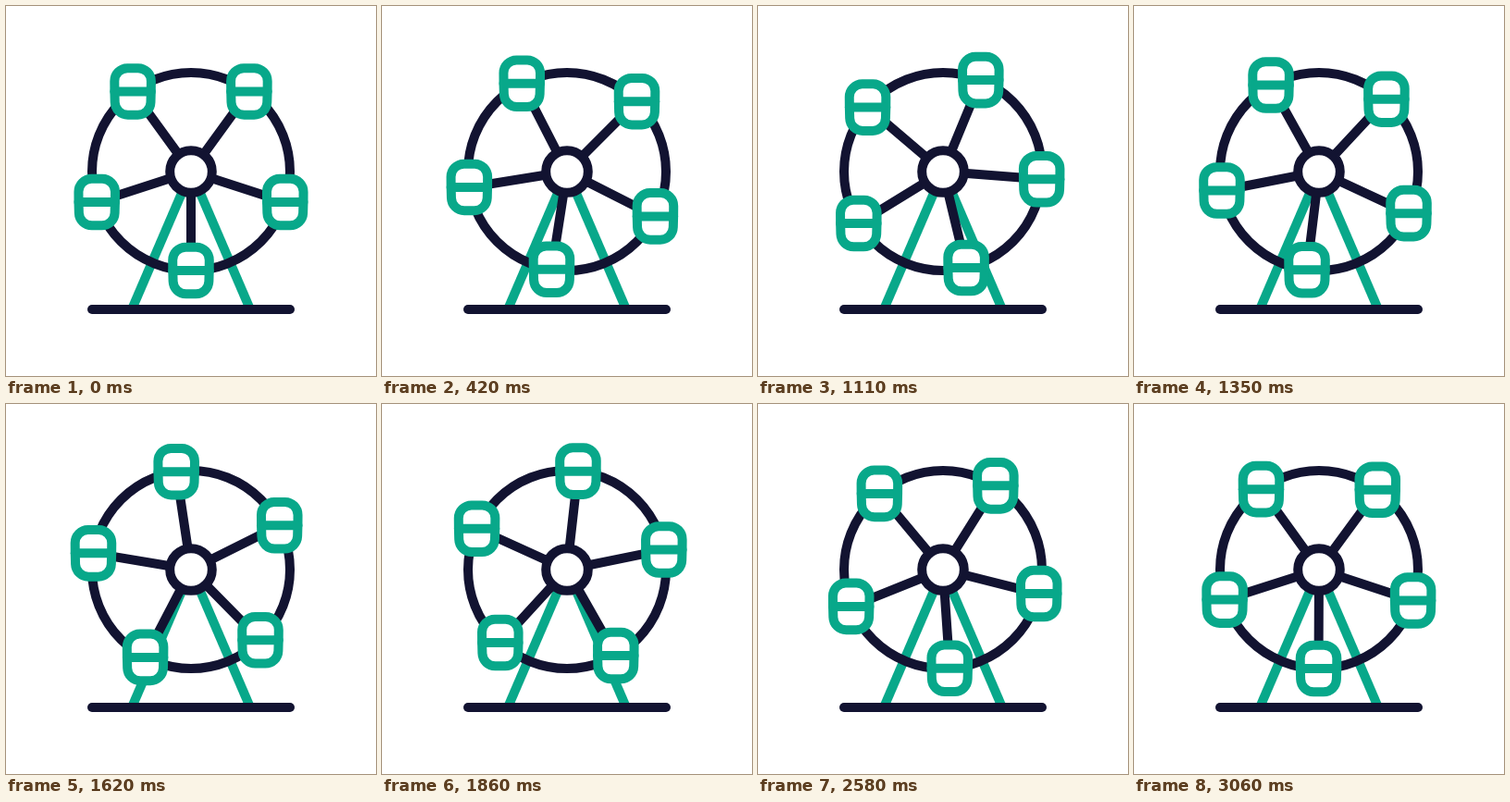
An HTML page with a canvas for the animation above (5.09 s loop, 400 by 400 pixels).

```html
<!DOCTYPE html>
<html lang="en">
<head>
<meta charset="utf-8">
<title>Ferris wheel</title>
<style>
  html, body { margin: 0; width: 100%; height: 100%; overflow: hidden; background: #fff; }
  canvas { display: block; width: 400px; height: 400px; }
</style>
</head>
<body>
<canvas id="stage" width="400" height="400"></canvas>
<script>
const ctx = document.getElementById('stage').getContext('2d');
const NAVY = '#121331', GREEN = '#08a88a', WHITE = '#fff';
const CX = 200, CY = 179, RADIUS = 107, HUB = 22.8;
const LOOP = 5090, SPIN = 3060, STEP = 30, TURN = 144.25;
const X1 = 0.331, X2 = 0.441;

// Cubic bezier easing (X1, 0, X2, 1), solved by bisection.
function ease(x) {
  if (x <= 0) return 0;
  if (x >= 1) return 1;
  let lo = 0, hi = 1;
  for (let i = 0; i < 30; i++) {
    const s = (lo + hi) / 2, r = 1 - s;
    const bx = 3 * s * r * r * X1 + 3 * s * s * r * X2 + s * s * s;
    if (bx < x) lo = s; else hi = s;
  }
  return lo * lo * (3 - 2 * lo);
}

function line(color, x1, y1, x2, y2) {
  ctx.strokeStyle = color;
  ctx.beginPath();
  ctx.moveTo(x1, y1);
  ctx.lineTo(x2, y2);
  ctx.stroke();
}

function ring(r, fill) {
  ctx.beginPath();
  ctx.arc(CX, CY, r, 0, Math.PI * 2);
  if (fill) {
    ctx.fillStyle = fill;
    ctx.fill();
  }
  ctx.strokeStyle = NAVY;
  ctx.stroke();
}

function cabin(x, y) {
  const top = 19.9, mid = 19.7, low = 19, h = 25.3, r = 14;
  ctx.save();
  ctx.translate(x, y);
  ctx.beginPath();
  ctx.moveTo(-mid, 0);
  ctx.arcTo(-top, -h, 0, -h, r);
  ctx.arcTo(top, -h, mid, 0, r);
  ctx.lineTo(mid, 0);
  ctx.arcTo(low, h, 0, h, r);
  ctx.arcTo(-low, h, -mid, 0, r);
  ctx.closePath();
  ctx.fillStyle = WHITE;
  ctx.fill();
  ctx.strokeStyle = GREEN;
  ctx.stroke();
  line(GREEN, -mid, 0, mid, 0);
  ctx.restore();
}

function draw(time) {
  const t = Math.floor(time / STEP) * STEP;
  const turn = TURN * ease(t / SPIN);
  const seats = [0, 1, 2, 3, 4].map(i => {
    const a = (18 + i * 72 + turn) * Math.PI / 180;
    return [CX + RADIUS * Math.cos(a), CY + RADIUS * Math.sin(a)];
  });

  ctx.fillStyle = WHITE;
  ctx.fillRect(0, 0, 400, 400);
  ctx.lineWidth = 10;
  ctx.lineJoin = 'round';

  ctx.lineCap = 'butt';
  line(GREEN, CX, CY, 136, 328);
  line(GREEN, CX, CY, 264, 328);
  ctx.lineCap = 'round';
  line(NAVY, 93, 328, 307, 328);

  ring(RADIUS);
  for (const [x, y] of seats) line(NAVY, CX, CY, x, y);
  ring(HUB, WHITE);
  for (const [x, y] of seats) cabin(x, y);
}

const start = performance.now();
function tick() {
  draw((performance.now() - start) % LOOP);
  requestAnimationFrame(tick);
}
tick();
</script>
</body>
</html>
```
